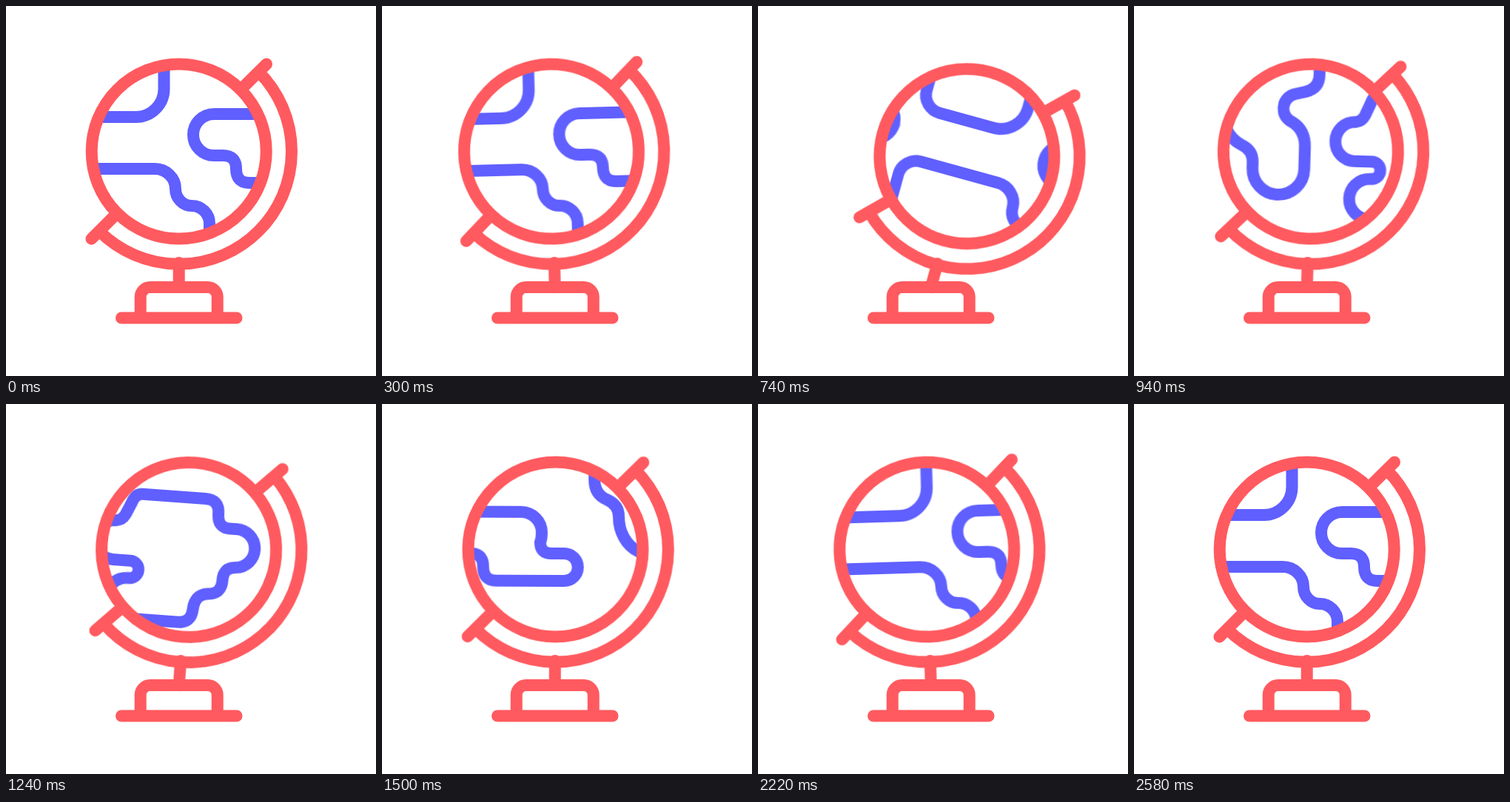
Animation, 500 px wide and 500 px high, one loop 2720 ms. Source, as an HTML page:

```html
<!DOCTYPE html>
<html lang="en">
<head>
<meta charset="utf-8">
<title>Spinning globe</title>
<style>
  html, body { margin: 0; width: 100%; height: 100%; overflow: hidden; background: #fff; }
  svg { display: block; width: 100vw; height: 100vh; }
  path, circle { fill: none; stroke-width: 16; stroke-linecap: round; stroke-linejoin: round; }
  .frame { stroke: #ff5a5f; }
  .coast { stroke: #605fff; }
  #globe { transform-origin: 233.7px 380px; }
</style>
</head>
<body>
<svg viewBox="0 0 500 500">
  <defs>
    <clipPath id="disc"><circle cx="233.7" cy="196.5" r="112"/></clipPath>
    <g id="map" class="coast">
      <path d="M213.5 60V112A38 38 0 0 1 175.5 150H100A25 25 0 0 1 75 125V60"/>
      <path d="M275 320V294A24 24 0 0 0 251 270A22 23 0 0 1 229 247A28 27 0 0 0 201 220H93A25 25 0 0 0 68 245V320"/>
      <path d="M362 146H281A28 28 0 0 0 281 202H293Q311 202 311 220Q311 239 329 239H420.5A18.5 18.5 0 0 0 420.5 202H403Q388 202 388 187Q390 182 390 174A28 28 0 0 0 362 146Z"/>
      <path d="M461 60V102Q461 122 478 129Q494 136 494 152C494 172 504 191 521 199Q537 206 537 222V230A35 35 0 0 0 607 230V200Q607 177 589 166.500A20 20 0 0 1 592 128.500L606 125Q624 120 624 102V60"/>
      <path d="M708 126H793Q812 126 812 145Q812 164 829 164H837A26 26 0 0 1 840 216Q824 217 824 234Q824 253 806 254Q788 256 787 276Q786 295 768 295H696A27 27 0 0 1 696 240.500H698A11.700 11.700 0 0 0 698 217H674.500A26.500 26.500 0 0 1 674.500 164Q683 163 687 155L694 139Q698 126 708 126Z"/>
    </g>
  </defs>

  <g id="globe">
    <g clip-path="url(#disc)">
      <g id="land">
        <use href="#map"/>
        <use href="#map" x="820" y="-9"/>
        <use href="#map" x="1640"/>
      </g>
    </g>
    <g class="frame">
      <circle cx="233.7" cy="196.5" r="118"/>
      <path d="M352 78.500L317.200 113M115.500 314.700L150.200 280M341.400 88.800A152.300 152.300 0 0 1 126 304.200"/>
      <path d="M233.700 347V380"/>
    </g>
  </g>
  <path class="frame" d="M156 421.500H311.500M181.700 421.500V393A13 13 0 0 1 194.700 380H272.700A13 13 0 0 1 285.700 393V421.500"/>
</svg>
<script>
  const LOOP = 2720;
  const SWING = 'cubic-bezier(.37,0,.63,1)';
  const SPIN = 'cubic-bezier(.33,0,.39,1)';

  // Each step: [time in ms, value, easing towards the next step]
  function play(id, steps, toTransform) {
    const frames = steps.map(([time, value, easing = SWING]) => ({
      offset: time / LOOP,
      transform: toTransform(value),
      easing
    }));
    document.getElementById(id).animate(frames, { duration: LOOP, iterations: Infinity });
  }

  play('globe', [
    [0, 0], [180, 0], [540, -5.85], [735, 15.4], [1093, -6.9], [1304, 7],
    [1620, -2.8], [1900, 3], [2130, -1.9], [2580, 0], [LOOP, 0]
  ], deg => `rotate(${deg}deg)`);

  // Two full turns to the right, with a pull back before and an overshoot after
  play('land', [
    [0, -1640], [180, -1640], [540, -1673, SPIN], [1975, 35], [2580, 0], [LOOP, 0]
  ], x => `translateX(${x}px)`);
</script>
</body>
</html>
```
